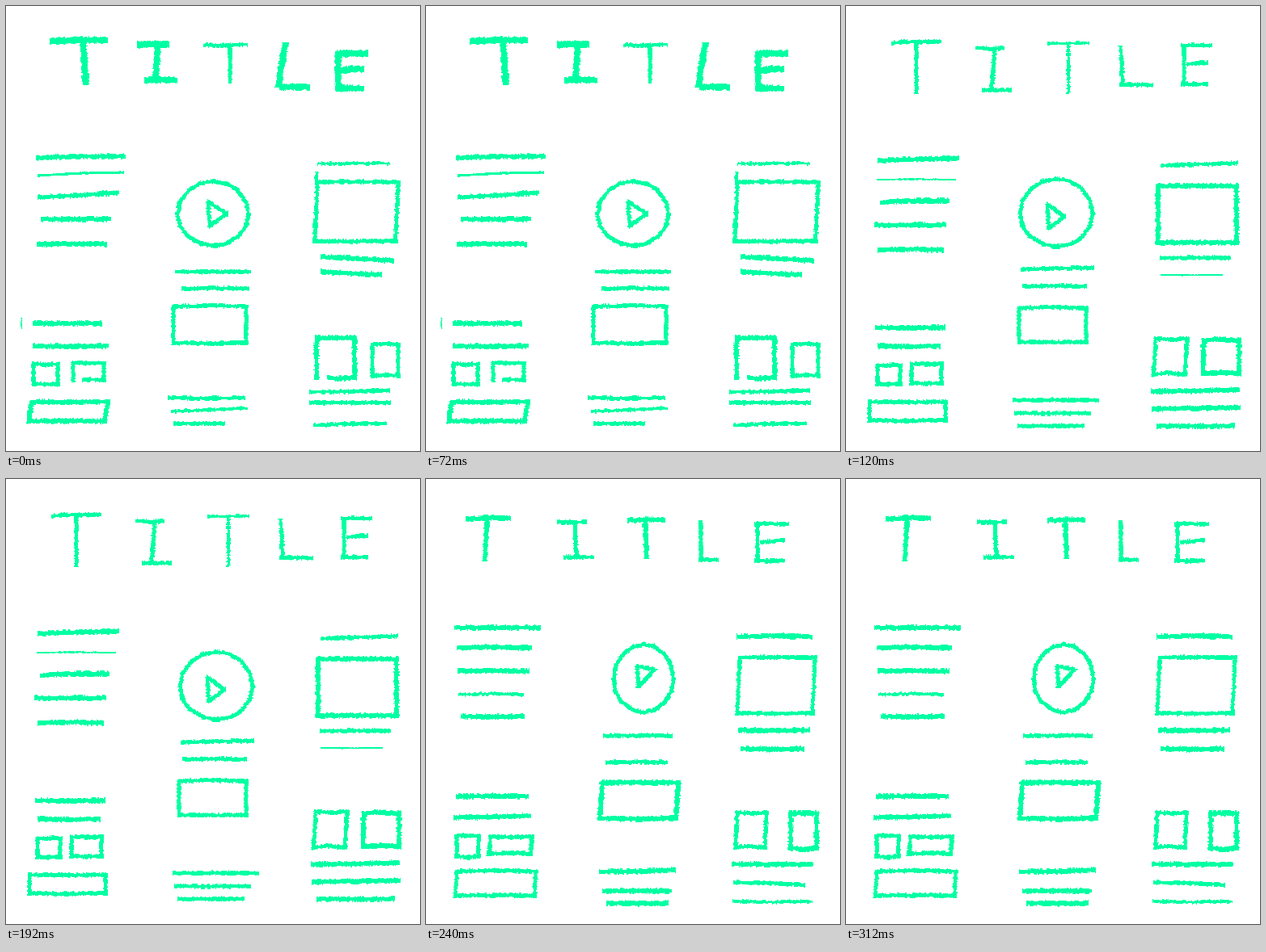
An HTML page with a canvas that plays this animation: 512x551 px, repeating every 0.36 s.

```html
<!DOCTYPE html>
<html lang="en">
<head>
<meta charset="utf-8">
<title>Wireframe sketch</title>
<style>
  html, body { margin: 0; height: 100%; overflow: hidden; background: #fff; }
  canvas { display: block; }
</style>
</head>
<body>
<canvas id="stage" width="512" height="551"></canvas>
<script>
const ctx = document.getElementById('stage').getContext('2d');
const HOLD = 120;
let seed, pen;
const random = () => (seed = seed * 16807 % 2147483647) / 2147483647;
const wobble = size => (random() - 0.5) * size;

// Fill one-pixel slices across the segment, with ragged ends like chalk.
function segment([x1, y1], [x2, y2], extend) {
  const dx = x2 - x1, dy = y2 - y1;
  const flat = Math.abs(dx) > Math.abs(dy);
  const span = Math.max(Math.abs(dx), Math.abs(dy));
  const half = pen / 2 * Math.hypot(dx, dy) / span;
  const rough = pen > 3 ? 2 : 0.6;
  let a = 0, b = 0;
  for (let i = -extend; i <= span + extend; i++) {
    if (random() < 0.6) [a, b] = [wobble(rough), wobble(rough)];
    const x = x1 + dx * i / span, y = y1 + dy * i / span;
    const mid = flat ? y : x;
    const from = Math.round(mid - half + a);
    const size = Math.max(1, Math.round(mid + half + b) - from);
    if (flat) ctx.fillRect(Math.round(x), from, 1, size);
    else ctx.fillRect(from, Math.round(y), size, 1);
  }
}

function path(points, extend = 0) {
  points.slice(1).forEach((p, i) => segment(points[i], p, extend));
}

function line(x1, x2, y, rise = 0) {
  path([[x1, y + rise / 2], [(x1 + x2) / 2, y + wobble(2)], [x2, y - rise / 2]]);
}

function stem(x, y1, y2, lean = 0) {
  path([[x - lean / 2, y1], [x + lean / 2, y2]]);
}

// The lower edge may stop short of the left side; lean shifts it sideways.
function box(l, t, r, b, lean = 0, gap = 0) {
  const middle = (l + r) / 2;
  path([[l + lean, b], [l, t], [middle, t + wobble(3)], [r, t],
    [r + lean, b], [middle + lean, b + wobble(3)], [l + lean + gap, b]], 2);
}

function ring(x, y, rx, ry) {
  const points = [];
  for (let i = 0; i <= 16; i++) {
    const a = i * Math.PI / 8;
    points.push([x + rx * Math.cos(a), y + ry * Math.sin(a)]);
  }
  path(points, 1);
}

function play(x, y, w, h, tip = h / 2) {
  path([[x, y], [x + 2, y + h], [x + w, y + tip], [x, y]], 1);
}

function T(l, r, y, x, b, lean = 0) { line(l, r, y, 1); stem(x, y, b, lean); }
function I(l, t, r, b, lean = 0) {
  const w = (r - l) * 0.8;
  line(l, l + w, t); line(r - w - 1, r, b); stem((l + r) / 2, t, b, lean);
}
function L(l, t, r, b, lean = 0) { stem(l, t, b, lean); line(l - 3, r, b); }
function E(l, t, r, b) {
  stem(l + 4, t, b); line(l, r, t); line(l + 7, r - 5, (t + b) / 2 - 2, 2); line(l, r - 5, b);
}

function first() {
  pen = 8; T(54, 125, 43, 97, 97, 3); I(162, 48, 211, 92, -3); L(341, 45, 375, 100, -9);
  E(407, 59, 447, 102);
  pen = 5; T(244, 298, 48, 277, 95);
  pen = 6;
  line(37, 147, 187, 2); line(39, 139, 234, 6); line(43, 129, 264); line(38, 124, 295);
  pen = 3; line(39, 145, 208, 4);
  pen = 5; ring(256, 257, 44, 40); play(250, 243, 23, 29);
  line(209, 302, 329); line(217, 300, 350); box(207, 372, 297, 417);
  line(200, 295, 485); line(207, 270, 517);
  pen = 4; line(204, 298, 500, 4);
  line(385, 474, 195); stem(384, 205, 218);
  pen = 5; box(385, 218, 485, 291, -3);
  pen = 6; line(389, 479, 313, -5); line(389, 464, 331, -4);
  line(33, 118, 393); line(33, 126, 421);
  pen = 5; box(34, 443, 64, 468, 0, 4); box(83, 442, 121, 463, 0, 13);
  pen = 6; box(32, 490, 126, 514, -4);
  box(384, 411, 431, 460, 0, 14);
  pen = 5; box(453, 419, 485, 458);
  line(375, 474, 477, 2); line(375, 475, 491); line(380, 470, 518, 3);
  pen = 1; stem(19, 386, 399);
}

function second() {
  pen = 5; T(56, 117, 45, 87, 108); I(160, 52, 204, 104, -4); L(341, 49, 379, 98, 3);
  E(414, 49, 452, 97);
  pen = 4; T(249, 300, 46, 275, 108);
  pen = 6;
  line(39, 139, 190, 3); line(42, 127, 242, 2); line(35, 123, 271); line(39, 120, 302);
  pen = 2; line(38, 135, 215);
  pen = 5; ring(260, 256, 45, 42); play(249, 246, 21, 29);
  line(216, 306, 325, 2); line(218, 297, 347); box(214, 374, 297, 416);
  line(206, 312, 488); line(208, 302, 504); line(212, 294, 520);
  line(389, 484, 196, 3);
  pen = 6; box(386, 223, 483, 293);
  pen = 5; line(388, 475, 312);
  pen = 2; line(389, 465, 333);
  pen = 6; line(36, 122, 398); line(39, 116, 421);
  pen = 5; box(39, 445, 67, 468); box(81, 443, 118, 467);
  box(29, 490, 123, 513);
  box(383, 412, 422, 456, -3);
  pen = 6; box(442, 414, 486, 455);
  line(377, 486, 476, 2); line(378, 487, 498, 2); line(384, 480, 520);
}

function third() {
  pen = 6; T(49, 104, 49, 74, 101, -3); T(249, 295, 51, 272, 98, 2);
  pen = 5; I(162, 53, 208, 97, 2); L(340, 51, 361, 100); E(406, 56, 448, 101);
  pen = 6;
  line(35, 141, 184); line(38, 130, 209); line(39, 127, 238); line(43, 121, 294);
  pen = 4; line(40, 120, 267);
  pen = 5; ring(269, 247, 37, 42); play(261, 232, 21, 25, 4);
  line(219, 304, 318); line(222, 298, 351);
  pen = 6; box(218, 376, 312, 420, -3);
  line(214, 308, 485, 2); line(218, 303, 510); line(223, 299, 525);
  line(384, 477, 195);
  pen = 5; box(388, 221, 481, 290, -3);
  pen = 6; line(386, 474, 311); line(389, 467, 334);
  line(37, 126, 393); line(34, 129, 418, 2);
  pen = 5; box(38, 442, 65, 467); box(80, 443, 131, 464, -2);
  box(38, 486, 136, 516, -2);
  box(385, 413, 421, 456, -2);
  pen = 6; box(451, 414, 483, 457);
  line(378, 478, 477); pen = 5; line(380, 468, 501, -3);
  pen = 4; line(379, 477, 523);
}

const poses = [first, second, third];
let shown = -1;

function tick() {
  const pose = Math.floor(performance.now() / HOLD) % poses.length;
  if (pose !== shown) {
    shown = pose;
    seed = 71 + pose * 997;
    ctx.fillStyle = '#fff';
    ctx.fillRect(0, 0, 512, 551);
    ctx.fillStyle = '#00ffa2';
    poses[pose]();
  }
  requestAnimationFrame(tick);
}
tick();
</script>
</body>
</html>
```
